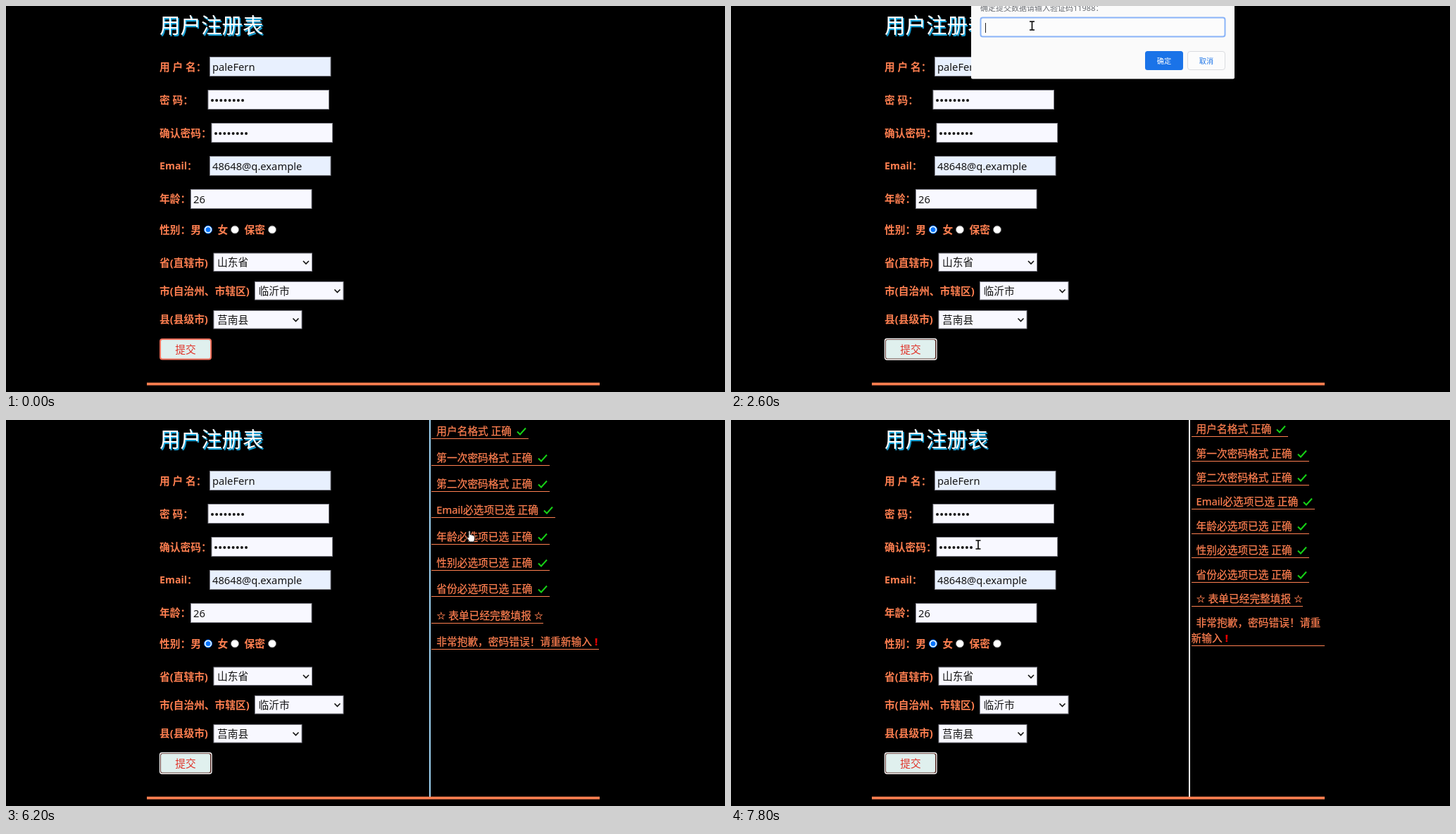
An HTML page that plays this animation: 1021 by 548 pixels, repeating every 8000 ms.

```html
<!DOCTYPE html>
<html lang="zh-CN">
<head>
<meta charset="utf-8">
<style>
html, body { margin: 0; width: 100%; height: 100%; overflow: hidden; background: #000; }
body, svg { font: 14.72px "Noto Sans", "Noto Sans CJK SC", sans-serif; }
#stage { position: absolute; left: 0; top: 0; }
#stage text { white-space: pre; }
.label { fill: coral; font-weight: bold; }
#panel { position: absolute; box-sizing: border-box; overflow: hidden; color: coral;
  padding: .9px 0 0 1.5px; border-left: 2px solid; -webkit-text-stroke: .25px; }
#panel p { width: fit-content; margin: var(--gap) 0 0; line-height: 22px; text-indent: 7px;
  border-bottom: 1px solid coral; }
#panel svg { width: 14px; height: 12px; margin: 0 3px 0 7px; vertical-align: -1px; }
#panel i { font: 14.72px "DejaVu Sans", sans-serif; }
#panel b { color: #e00; margin: 0 2px 0 4px; }
</style>
</head>
<body>
<div id="panel"></div>
<svg id="stage" width="1021" height="548" viewBox="0 0 1021 548">
  <g id="form"></g>
  <g id="dialog">
    <rect x="341" y="-40" width="374" height="143.5" rx="2" fill="#fafafa"/>
    <text x="354" y="6.5" font-size="11" fill="#6a6d72">确定提交数据请输入验证码11988：</text>
    <rect id="entry" x="354.5" y="16.5" width="347" height="27" rx="3" fill="#fcfcfc"/>
    <text id="code" x="361" y="35" font-size="10.5" fill="#222"></text>
    <path id="caret" stroke="#222"/>
    <rect x="588" y="64" width="54" height="27" rx="3.5" fill="#1a73e8"/>
    <rect x="648.5" y="64.5" width="53" height="26" rx="3.5" fill="#fcfcfc" stroke="#dadce0"/>
    <g font-size="10.2" text-anchor="middle">
      <text x="615" y="81.5" fill="#fff" font-weight="500">确定</text>
      <text x="675" y="81.5" fill="#1a73e8">取消</text>
    </g>
  </g>
  <g id="cursor">
    <path id="hand" fill="#fff" stroke="#111" stroke-width=".9" stroke-linejoin="round"
      d="M-3 1V-7Q-2-9-.8-7V-2Q1-3 1.6-1.5Q3-2.4 3.6-.8Q5.5-1.2 5.6.8V4Q5.4 6 4 8H-2Q-3 6-5.4 2.5Q-5.6.5-3 2Z"/>
    <path id="arrow" fill="#fff" stroke="#111" stroke-width=".8"
      d="M-5.5-8.5V5.5L-2.3 2.6L0 8.3L2.2 7.4L0 2H4.8Z"/>
    <g id="beam" fill="none">
      <path stroke="#fff" stroke-width="3" d="M-3-6H3M0-6V6M-3 6H3"/>
      <path stroke="#000" stroke-width="1.6" d="M-3.5-6H3.5M0-6V6M-3.5 6H3.5"/>
    </g>
  </g>
</svg>
<script>
const LOOP = 8000, STEP = 100;
const $ = id => document.getElementById(id);

// ---- static form ----
const text = (x, mid, s, attrs = 'class="label"') => `<text x="${x}" y="${mid + 5.4}" ${attrs}>${s}</text>`;
const rect = (x, y, w, h, attrs) => `<rect x="${x}" y="${y}" width="${w}" height="${h}" ${attrs}/>`;
const circle = (x, y, r, attrs) => `<circle cx="${x}" cy="${y}" r="${r}" ${attrs}/>`;
const INK = 'fill="#151515"', PALE = '#f8f8ff', FILLED = '#e8f0fe';

const field = (x, y, fill, content = '') =>
  rect(x + .5, y + .5, 171.5, 27, `fill="${fill}" stroke="#858590"`) + text(x + 4, y + 14.5, content, INK);
const dots = (x, y) => Array.from({length: 8}, (_, i) => circle(x + 6.15 * i, y, 2, INK)).join('');
const select = (x, y, w, s) =>
  rect(x + .5, y + .5, w - 1, 25.5, `fill="${PALE}" stroke="#858590"`) + text(x + 5.5, y + 13.5, s, INK) +
  `<path d="M${x + w - 13} ${y + 11.5}l4 4 4-4" fill="none" stroke="#111" stroke-width="1.6"/>`;
const radio = (x, on) => circle(x, 317.5, 5.5, `fill="#fff" stroke="${on ? '#0075ff' : '#767676'}" stroke-width="1"`) +
  (on ? circle(x, 317.5, 3.5, 'fill="#0075ff"') : '');

$('form').innerHTML =
  text(218, 27.5, '用户注册表', 'dy="5.3" font-size="29.5" fill="#fff" style="text-shadow:1.5px 1.5px 1px #19b5f0"') +
  text(218, 87, '用 户 名：') + field(289, 72, FILLED, 'paleFern') +
  text(218, 134, '密 码：') + field(286.5, 119, PALE) + dots(293, 134) +
  text(218, 181, '确认密码：') + field(291.5, 166, PALE) + dots(298, 181) +
  text(218, 227, 'Email：', 'fill="coral" font-size="14.2" font-weight="600"') + field(289, 213, FILLED, '48648@q.example') +
  text(218, 274, '年龄：') + field(262, 260, PALE, '26') +
  text(218, 318, '性别：男') + radio(287, true) +
  text(300.5, 318, '女') + radio(325) + text(338.5, 318, '保密') + radio(378) +
  text(218, 364.5, '省(直辖市)') + select(294.5, 350.5, 140.5, '山东省') +
  text(218, 405, '市(自治州、市辖区)') + select(353, 391, 126.5, '临沂市') +
  text(218, 445, '县(县级市)') + select(294.5, 432, 126, '莒南县') +
  rect(219, 473, 72, 28.5, 'id="button" rx="3" fill="#e0f0ee" stroke="#f0705c" stroke-width="2"') +
  rect(218.5, 472.5, 73.5, 29.5, 'id="focus" rx="3" fill="none" stroke="#fff" stroke-width="1.3"') +
  text(255, 488, '提交', 'fill="#e0352b" text-anchor="middle"') +
  rect(200, 534.7, 643, 3.8, 'fill="coral"');

// ---- result list ----
const tick = '<svg viewBox="0 0 14 12"><path d="M1 6.5L5 10.5L13 1.5" fill="none" stroke="#16d016" stroke-width="2"/></svg>';
const checks = ['用户名格式', '第一次密码格式', '第二次密码格式', 'Email必选项已选', '年龄必选项已选', '性别必选项已选', '省份必选项已选'];
$('panel').innerHTML = [
  ...checks.map(s => s + ' 正确' + tick),
  '<i>☆</i> 表单已经完整填报 <i>☆</i>',
  '非常抱歉，密码错误！请重新输入<b>!</b>'
].map(s => `<p>${s}</p>`).join('');

// ---- pointer path: time, x, y, shape (none = hidden) ----
const path = [
  [0, 658, 192, 'none'], [100, 658, 192, 'arrow'], [300, 500, 335, 'arrow'], [500, 340, 470, 'arrow'],
  [700, 268, 520, 'arrow'], [900, 252, 505, 'arrow'], [1000, 251.5, 504.5, 'hand'], [1700, 251.5, 504.5, 'hand'],
  [1800, 275, 480, 'arrow'], [2000, 365, 355, 'arrow'], [2200, 437, 172, 'arrow'], [2300, 447, 115, 'arrow'],
  [2400, 433, 66, 'arrow'], [2500, 434, 24, 'beam'], [2600, 427.5, 28, 'beam'], [2900, 427, 30, 'none'],
  [4700, 427, 30, 'beam'], [4800, 688, 35, 'beam'], [4900, 922, 106, 'hand'], [5000, 950, 108, 'arrow'],
  [5200, 800, 98, 'arrow'], [5400, 640, 83, 'hand'], [5500, 617, 81, 'hand'], [5900, 617, 81, 'hand'],
  [6200, 660, 165, 'hand'], [6500, 670, 246, 'hand'], [7100, 670, 246, 'hand'], [7200, 630, 238, 'arrow'],
  [7400, 420, 200, 'arrow'], [7600, 298, 181, 'beam'], [7800, 351, 177, 'beam'], [LOOP, 351, 177, 'beam']
];
const keyTimes = [3600, 3800, 4000, 4300, 4400];
const show = (id, on) => $(id).style.display = on ? '' : 'none';
const ease = p => 1 - (1 - Math.min(1, Math.max(0, p))) ** 2;

function drawCursor(t) {
  const i = path.findLastIndex(k => k[0] <= t);
  const [t0, x0, y0, shape] = path[i], [t1, x1, y1] = path[i + 1];
  const p = (t - t0) / (t1 - t0);
  $('cursor').setAttribute('transform', `translate(${x0 + (x1 - x0) * p} ${y0 + (y1 - y0) * p})`);
  for (const id of ['hand', 'arrow', 'beam']) show(id, id === shape);
}

function drawDialog(t) {
  const fading = t < 1600 || t >= 5600;
  show('dialog', t >= 1500 && t < 5700);
  $('dialog').setAttribute('opacity', fading ? .5 : 1);
  $('dialog').setAttribute('transform', fading ? 'translate(528 -10) scale(1.013) translate(-528)' : '');
  $('entry').setAttribute('stroke', fading ? '#ccc' : '#8ab4f8');
  $('entry').setAttribute('stroke-width', fading ? 1 : 2);
  const typed = keyTimes.filter(k => k <= t).length;
  $('code').textContent = '11988'.slice(0, typed);
  $('caret').setAttribute('d', `M${361.5 + 6 * typed} 24V38`);
  const blinkStart = typed ? keyTimes[typed - 1] : 1400;
  show('caret', !fading && (t - blinkStart) % 1000 < 500);
}

function drawPanel(t) {
  const open = t < 7200 ? ease((t - 6000) / 500) : 1 - ease((t - 7200) / 500);
  const left = 650 - 77 * open, top = t < 5700 ? 325 : -11, s = $('panel').style;
  show('panel', t >= 5600);
  s.left = left + 'px';
  s.width = 843 - left + 'px';
  s.top = top + 'px';
  s.height = 535 - top + 'px';
  s.borderColor = `rgb(${255 - 150 * open},${255 - 65 * open},${255 - 15 * open})`;
  s.setProperty('--gap', 11.4 + 4.6 * open + 'px');
}

const start = performance.now();
function draw(now) {
  const t = Math.floor(Math.max(0, now - start) % LOOP / STEP) * STEP;
  const focused = t >= 1300;
  show('focus', focused);
  $('button').setAttribute('stroke', focused ? '#4a1c16' : '#f0705c');
  drawDialog(t);
  drawPanel(t);
  drawCursor(t);
  requestAnimationFrame(draw);
}
draw(start);
</script>
</body>
</html>
```
